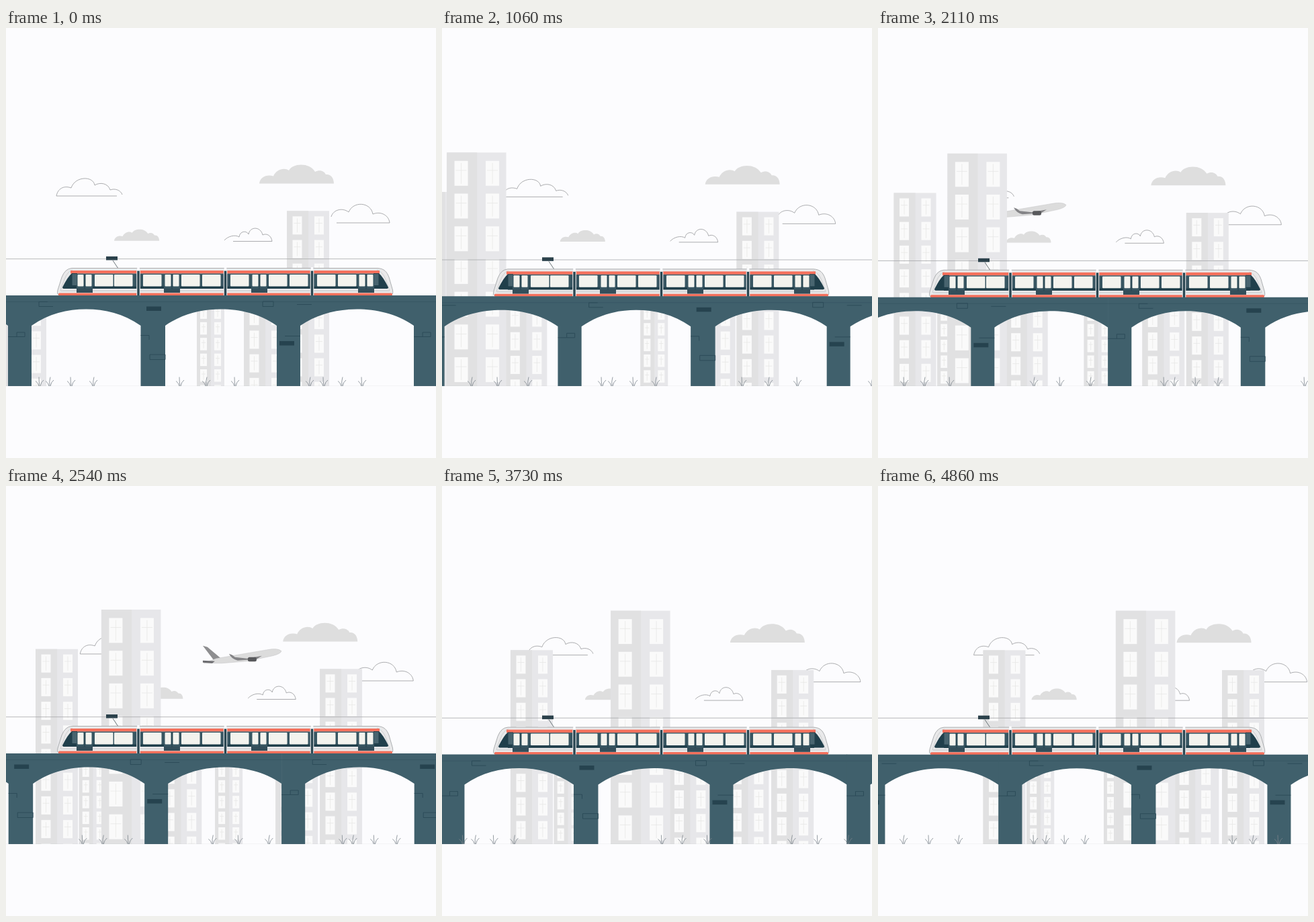
These frames come from a looping animation (640x640 px, 4.93 s). An HTML page:

```html
<!DOCTYPE html>
<html lang="en">
<head>
<meta charset="utf-8">
<title>City train</title>
<style>
html, body { margin: 0; width: 100%; height: 100%; overflow: hidden; background: #fcfcfe; }
svg { display: block; width: 100%; height: 100%; }
</style>
</head>
<body>
<svg id="stage" viewBox="0 0 640 640">
  <clipPath id="cut"><rect width="640" height="533"/></clipPath>
  <g clip-path="url(#cut)">
    <g id="scene">
      <g id="clouds"></g>
      <g id="city"></g>
      <path d="M0 343.7H640" stroke="#a6a8aa" stroke-width=".8"/>
      <g id="train"></g>
      <g id="bridge"></g>
    </g>
    <path d="M0 532.6H640" stroke="#8a9296" stroke-width=".6" opacity=".15"/>
    <g id="grass" fill="none" stroke="#7b858c" stroke-width=".8"></g>
  </g>
</svg>
<script>
const LOOP = 4930, STEPS = 70, STEP = LOOP / STEPS;
const NS = 'http://www.w3.org/2000/svg';
const $ = id => document.getElementById(id);

function add(parent, tag, attrs = {}) {
  const el = document.createElementNS(NS, tag);
  for (const k in attrs) el.setAttribute(k, attrs[k]);
  parent.appendChild(el);
  return el;
}
const rect = (p, x, y, width, height, fill, more) =>
  add(p, 'rect', { x, y, width, height, fill, ...more });
const path = (p, d, fill, stroke = 'none', w = 1) =>
  add(p, 'path', { d, fill, stroke, 'stroke-width': w });
const move = (el, x, y = 0) =>
  el.setAttribute('transform', `translate(${x.toFixed(2)} ${y.toFixed(2)})`);

function buildClouds() {
  const g = $('clouds'), grey = '#dedede';
  const puff = 'M0 27.5C1 18 11 13.5 21 16.5C25 7 37 3 44 8C50 -3 75 -4 83 10C90 6 97 9 99 14C106 13 111 19 111 27.5Z';
  path(g, puff, grey).setAttribute('transform', 'translate(377 204)');
  path(g, puff, grey).setAttribute('transform', 'translate(161 300) scale(.605)');
  [
    'M75 250C77 239 86 234 97 238C103 220 130 220 132 234C140 229 152 231 155 241C163 238 171 242 173 248M75 250H165',
    'M571 290C570 279 558 272 546 277C543 259 517 257 510 274C501 267 487 270 484 281M492 290H571',
    'M396 317.5C395 309 388 305 382 308C379 295 363 295 361 307C358 301 348 302 347 311C341 307 330 310 325 316M338 317.5H396'
  ].forEach(d => path(g, d, 'none', '#97999b', .8));
}

// Window grids: building width, first and second column, first row, window size, row pitch
const KINDS = {
  tall: { w: 88.5, cols: [11.5, 58], top: 12.5, ww: 20, wh: 37, pitch: 48.7 },
  mid: { w: 63, cols: [8.5, 41], top: 8, ww: 14, wh: 27, pitch: 35.2 },
  small: { w: 41, cols: [5, 26], top: 5, ww: 10, wh: 18.5, pitch: 23.4 }
};

function building(kind, top) {
  const k = KINDS[kind], g = add($('city'), 'g');
  rect(g, 0, top, k.w, 540 - top, '#e7e7ea');
  rect(g, 0, top, k.w * .51, 540 - top, '#e1e1e2');
  for (let y = top + k.top; y < 535; y += k.pitch)
    for (const x of k.cols) {
      rect(g, x, y, k.ww, k.wh, '#fafafa');
      path(g, `M${x + k.ww / 2} ${y + 3}v${k.wh - 6}M${x + 2} ${y + k.wh * .38}h${k.ww - 4}`, 'none', '#e8e8e6', .8);
    }
  return g;
}

function buildPlane() {
  const g = add($('city'), 'g');
  path(g, 'M-74 -20L-67 -18L-48 -2L-58 1Z', '#8e8e90');
  path(g, 'M-73 6L-54 -1L22 -14Q38 -17 43 -12Q42 -8 30 -5L-8 3L-45 6Z', '#dcdcdc', '#c2c2c4', .5);
  path(g, 'M-74 2L-56 3L-60 6L-74 5Z', '#6c6c70');
  path(g, 'M-35 -8Q-30 -7 -26 -3L-8 -1L14 -5L6 0L-22 2Q-31 0 -35 -8Z', '#848487');
  rect(g, -7, -3, 13, 6.5, '#58595c', { rx: 2.5 });
  return g;
}

function buildTrain() {
  const g = $('train'), red = '#f5705c', dark = '#385662', deep = '#203f4b', body = '#e9e9ea', glass = '#f3f3ee';
  path(g, 'M159 346L167 358', 'none', '#6a7478', 1);
  rect(g, 149, 340, 17, 5.5, '#2b414b');
  path(g, 'M98 357.5H553C563 358 567 363 570 371L575.5 390Q577 398 571 398H81Q75 398 77 390L83 371Q88 358 98 357.5Z', body, '#a4a8aa', .9);
  path(g, 'M99 360Q91 363 87 374L81 391H571L565 374Q561 363 552 360', 'none', '#c6c8ca', .8);
  rect(g, 96, 361, 460, 4.5, red);
  rect(g, 98, 365.5, 456, 22.5, dark);
  rect(g, 98, 384.5, 456, 3.5, deep);
  const nose = 'M98 365Q92 370 84 386Q84 388 87 388H106V365Z';
  path(g, nose, deep);
  path(g, nose, deep).setAttribute('transform', 'matrix(-1 0 0 1 653 0)');
  rect(g, 98.5, 366, 7, 17, '#48646f');
  rect(g, 547.5, 366, 7, 17, '#48646f');
  path(g, 'M82 391.5H571', 'none', '#cfd0d2', .8);
  rect(g, 78, 394.5, 497, 3.7, red, { rx: 1.5 });

  const pane = (x, w) => rect(g, x, 367, w, 17.5, glass, { rx: 1 });
  const door = x => {
    rect(g, x, 366, 24, 28, dark);
    rect(g, x, 387.5, 24, 6.5, '#334e5a');
    [1.5, 13.5].forEach(d => pane(x + d, 9));
    path(g, `M${x + 12} 366v22`, 'none', deep, 1);
  };
  [132, 161, 204, 261, 292, 334, 391, 422, 463, 494].forEach(x => pane(x, 27.5));
  [105, 235, 365, 524].forEach(door);
  for (const x of [197, 326.5, 455.5]) {
    rect(g, x - 1.8, 356, 3.6, 6, '#fcfcfe');
    rect(g, x - 2.8, 361, 5.6, 37.2, body);
    rect(g, x - 1.7, 361.5, 3.4, 37, '#2b4752');
  }
}

const SPAN = 604;
function buildBridge() {
  const arch = (l, r) => {
    const m = (l + r) / 2;
    return `V443C${r - 26} 425 ${m + 28} 418.5 ${m} 418.5S${l + 26} 425 ${l} 443V533`;
  };
  const shape = `M3 398H607.6V533H607${arch(438, 607)}H403${arch(237, 403)}H200.5${arch(38, 200.5)}H3Z`;
  const bricks = 'M3 459.5H16M16 459.5V453H28V459.5H16M70 414.5H49V407.5H62M200.5 457.5H213V464M214 486H237V493.5H214ZM382 407H398V414.5H382ZM433 411.5H455M415 458.5H438';
  for (const n of [-1, 0, 1]) {
    const g = add($('bridge'), 'g', { transform: `translate(${n * SPAN} 0)` });
    path(g, shape, '#40606c');
    path(g, 'M3 407.5H607', 'none', '#345460', .7);
    path(g, bricks, 'none', '#2b4a57', .9);
    rect(g, 209, 414.5, 22, 6.5, '#26434f');
    rect(g, 407, 466, 22, 6.5, '#26434f');
  }
}

function buildGrass() {
  const tufts = [530, 500, 473, 452, 341, 298, 259, 130, 97, 65, 50, -60, -105, -144, -269,
    -307, -337, -557, -587, -615, -633, -745, -789, -827];
  tufts.forEach((x, i) => add($('grass'), 'path', {
    d: `M0 533Q-1 526 ${i % 2 ? 1 : -1} 519.5M-1 533Q-2 528 -6 525.5M1 533Q2 527 6 524`,
    transform: `translate(${x} 0)`
  }));
}

buildClouds();
// Back to front: [element, start x, speed in px per ms]
const movers = [
  [$('clouds'), 0, .0139],
  [building('small', 409.4), 284, .0107],
  [building('mid', 407.2), 354, .0186],
  [building('mid', 272.3), 418, .01934],
  [building('small', 409.4), -14, .0484],
  [building('mid', 242.7), -78.7, .0484]
];
const plane = buildPlane();
movers.push(
  [building('mid', 408.2), -3, .0912],
  [building('tall', 184), -89.3, .0912],
  [$('grass'), 0, .178]
);
buildTrain();
buildBridge();
buildGrass();

function draw(t) {
  for (const [el, x, v] of movers) move(el, x + v * t);
  move(plane, 519 + (t - 3030) * .3075, 240.3 - (t - 3030) * .0352);
  move($('bridge'), (t * .1606) % SPAN);
  move($('scene'), 0, 1.4 - 1.4 * Math.cos(t / 281.2 * 2 * Math.PI));
}

const start = performance.now();
function tick(now) {
  const t = Math.max(0, now - start) % LOOP;
  draw(Math.min(STEPS - 1, Math.floor((t + 5) / STEP)) * STEP);
  requestAnimationFrame(tick);
}
draw(0);
requestAnimationFrame(tick);
</script>
</body>
</html>
```
